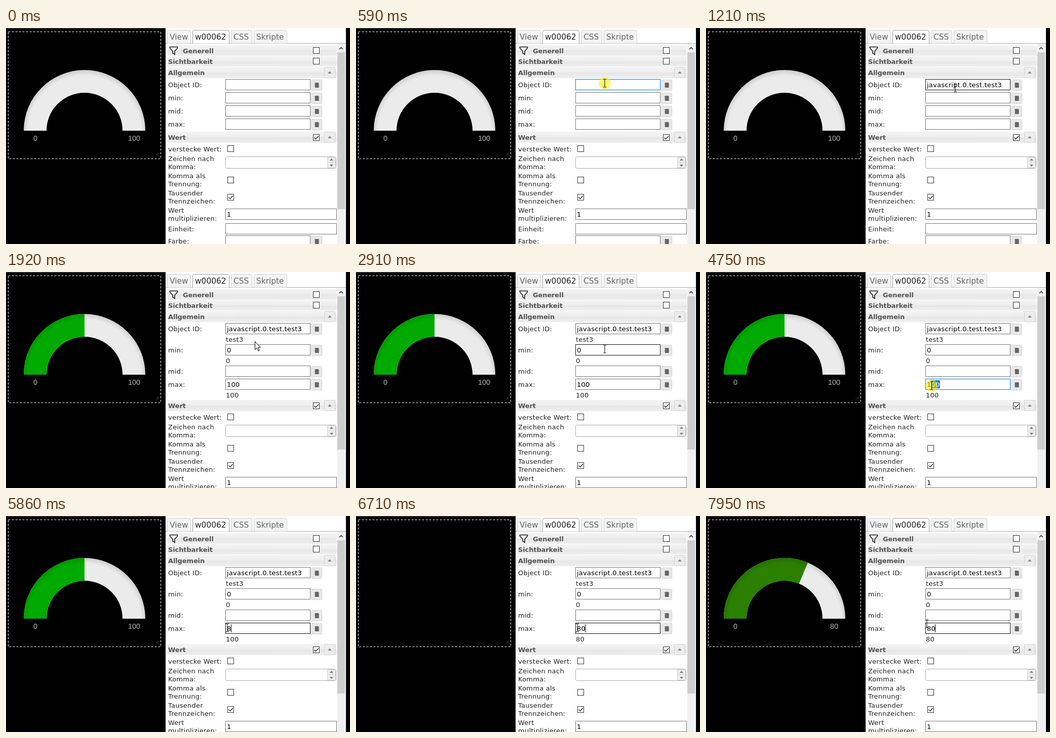
These frames come from a looping animation (679 by 427 pixels, 8 s). An HTML page:

```html
<!DOCTYPE html>
<html lang="de">
<head>
<meta charset="utf-8">
<title>Gauge settings</title>
<style>
html, body { margin: 0; width: 100%; height: 100%; overflow: hidden; background: #000; }
svg { display: block; }
text { font: 13px "DejaVu Sans", sans-serif; letter-spacing: .25px; fill: #222; white-space: pre; }
.head { font-weight: bold; letter-spacing: -.12px; fill: #555; }
.tab { font-size: 15.4px; letter-spacing: 0; fill: #666; }
.tab.on { fill: #222; }
.val { fill: #000; }
.scale { font: 14.5px "Liberation Sans", sans-serif; letter-spacing: 0; fill: #b3b3b3; text-anchor: middle; }
</style>
</head>
<body>
<svg id="stage" width="679" height="427" viewBox="0 0 679 427">
  <defs>
    <linearGradient id="bar" x2="0" y2="1">
      <stop offset="0" stop-color="#f3f3f3"/><stop offset=".48" stop-color="#eee"/>
      <stop offset=".5" stop-color="#e6e6e6"/><stop offset="1" stop-color="#eee"/>
    </linearGradient>
    <radialGradient id="shade" gradientUnits="userSpaceOnUse" cx="155" cy="206" r="123">
      <stop offset=".91" stop-opacity="0"/><stop offset="1" stop-opacity=".13"/>
    </radialGradient>
  </defs>
</svg>
<script>
const LOOP = 8000;
const stage = document.getElementById('stage');
const $ = id => document.getElementById(id);

// Markup helpers
const box = (x, y, w, h, fill, stroke, more = '') =>
  `<rect x="${x + .5}" y="${y + .5}" width="${w - 1}" height="${h - 1}" fill="${fill}" stroke="${stroke}" ${more}/>`;
const fillBox = (x, y, w, h, fill, more = '') =>
  `<rect x="${x}" y="${y}" width="${w}" height="${h}" fill="${fill}" ${more}/>`;
const text = (x, y, s, cls = '', more = '') => `<text x="${x}" y="${y}" class="${cls}" ${more}>${s}</text>`;
const path = (d, fill, stroke = 'none', more = '') => `<path d="${d}" fill="${fill}" stroke="${stroke}" ${more}/>`;
const group = (id, s) => `<g id="${id}">${s}</g>`;

const sector = share => {
  const a = Math.PI * (1 - share), c = Math.cos(a), s = Math.sin(a);
  return `M35 203A120 120 0 0 1 ${155 + 120 * c} ${203 - 120 * s}` +
    `L${155 + 75 * c} ${203 - 75 * s}A75 75 0 0 0 80 203Z`;
};

const check = (x, y, on) => box(x, y, 13, 13, '#fff', '#333') +
  (on ? path(`M${x + 2.5} ${y + 6.5}l3 3l5.5 -6`, 'none', '#222', 'stroke-width="1.3"') : '');
const bar = (y, h) => fillBox(319, y, 334, h, 'url(#bar)');
const collapse = y => box(628, y, 22, 22, '#ececec', '#d3d3d3', 'rx="2"') +
  path(`M635 ${y + 13}h8l-4 -4.5z`, '#888');
const picker = y => box(602, y, 22, 22, '#e8e8e8', '#d3d3d3', 'rx="2"') +
  fillBox(610, y + 6, 7, 10, '#666') +
  path(`M609 ${y + 7.5}h2m-2 3h2m-2 3h2`, 'none', '#666') +
  path(`M617.5 ${y + 7}v9`, 'none', '#999');

const fields = [];
const field = (name, y, w, shift) => {
  fields.push({ name, y, w, shift });
  return box(433, y, w, 22, '#fff', '#767676', `id="f-${name}"`);
};
const idRow = (name, label, y, shift) => text(320, y + 16, label) + field(name, y, 168, shift) + picker(y + 1);
const pair = (y, a, b) => text(320, y, a) + text(320, y + 16, b);
const tab = (x, w, s, on) =>
  path(`M${x + .5} 30.5V7.5q0 -3 3 -3h${w - 7}q3 0 3 3v23`, on ? '#fff' : '#f3f3f3', on ? '#999' : '#d0d0d0') +
  text(x + 5, 23, s, on ? 'tab on' : 'tab');

const gauge = group('gauge',
  path(sector(1), '#ebebeb') + path('', '#00aa00', 'none', 'id="fill"') + path(sector(1), 'url(#shade)') +
  text(58, 223, '0', 'scale') + text(253, 223, '100', 'scale', 'id="top"'));

const left = fillBox(0, 0, 679, 427, '#000') + fillBox(0, 0, 315, 1, '#555') +
  box(4, 7, 302, 252, 'none', '#fff', 'stroke-dasharray="4 3"') +
  path('M301 245V252H294Z', '#1b1b1b') + gauge;

const panel = fillBox(315, 0, 356, 427, '#fff') + fillBox(315, 30, 356, 1, '#aaa') +
  tab(318, 47, 'View') + tab(368, 73, 'w00062', true) + tab(444, 42, 'CSS') + tab(489, 66, 'Skripte') +
  fillBox(654, 31, 16, 396, '#f0f0f0') + fillBox(654, 48, 15, 310, '#cdcdcd', 'id="thumb"') +
  path('M658 42l3.5 -3.5l3.5 3.5', 'none', '#505050', 'stroke-width="1.8"');

const heads = bar(34, 21) + bar(56, 20) + bar(77, 22) +
  path('M323.5 37.5h15v2l-5.5 6.5v6.5l-4 -3v-3.500l-5.500 -6.500z', 'none', '#222', 'stroke-width="1.6"') +
  text(349, 50, 'Generell', 'head') + text(320, 71, 'Sichtbarkeit', 'head') + text(320, 93, 'Allgemein', 'head') +
  check(606, 38) + check(606, 59) + collapse(77);

const rows = idRow('obj', 'Object ID:', 101, 0) + text(436, 117, '', 'val', 'id="obj"') +
  group('min', idRow('min', 'min:', 127, 16) + text(436, 143, '', 'val', 'id="low"')) +
  group('mid', idRow('mid', 'mid:', 153, 32)) +
  group('max', idRow('max', 'max:', 179, 32) + fillBox(436, 182, 0, 16, '#0078d7', 'id="sel"') +
    text(436, 195, '', 'val', 'id="high"') + fillBox(0, 182, 1, 16, '#000', 'id="caret"')) +
  group('notes', text(434, 138, 'test3') + text(434, 180, '0') + text(434, 248, '100', '', 'id="note"'));

const rest = group('rest',
  bar(205, 22) + text(320, 221, 'Wert', 'head') + check(606, 210, true) + collapse(205) +
  text(320, 244, 'verstecke Wert:') + check(437, 232) +
  pair(263, 'Zeichen nach', 'Komma:') + box(433, 254, 219, 24, '#fff', '#aaa', 'rx="3"') +
  box(634, 255, 17, 22, '#eee', '#d3d3d3') + fillBox(634, 265, 17, 1, '#d3d3d3') +
  path('M639 262h7l-3.5 -4zM639 270h7l-3.5 4z', '#777') +
  pair(297, 'Komma als', 'Trennung:') + check(437, 294) +
  pair(331, 'Tausender', 'Trennzeichen:') + check(437, 328, true) +
  pair(365, 'Wert', 'multiplizieren:') + field('mul', 357, 220, 48) + text(436, 373, '1', 'val') +
  text(320, 402, 'Einheit:') + field('unit', 386, 220, 48) +
  text(320, 426, 'Farbe:') + field('color', 410, 168, 48) + picker(411));

const mouse = group('mouse',
  '<circle id="halo" r="12" fill="#ffee00" fill-opacity=".55"/>' +
  path('M-3 -8h2.500l.5 .5l.5 -.5H3M0 -7.500V7.500M-3 8h2.500l.5 -.5l.5 .5H3', 'none', '#000', 'id="beam"') +
  path('M.5 .5v16l3.700 -3.500l2.600 6l2.400 -1l-2.600 -5.800h5z', '#fff', '#000', 'id="arrow"'));

stage.insertAdjacentHTML('beforeend', left + panel + heads + rows + rest + mouse);

// Pointer: [time, x, y, look]
const OFF = 0, ARROW = 1, BEAM = 2, PRESS = 3;
const pointer = [
  [0, 0, 0, OFF],
  [190, 560, 413, BEAM], [260, 548, 370, BEAM], [350, 530, 290, ARROW], [430, 510, 200, ARROW],
  [500, 497, 140, BEAM], [590, 491, 109, PRESS], [660, 491, 110, PRESS], [740, 491, 111, BEAM],
  [1130, 491, 114, BEAM], [1210, 492, 118, BEAM], [1280, 492, 121, BEAM],
  [1350, 491, 125, ARROW], [1430, 491, 127, ARROW], [1510, 491, 129, ARROW], [1740, 491, 137, ARROW],
  [2450, 0, 0, OFF], [2600, 491, 147, BEAM], [2750, 491, 149, BEAM], [2910, 491, 152, BEAM], [2990, 491, 153, BEAM],
  [4070, 487, 223, PRESS], [5060, 436, 225, BEAM], [5130, 437, 226, BEAM],
  [5530, 437, 225, BEAM], [5610, 437, 223, BEAM], [5690, 437, 221, BEAM], [7950, 436, 213, BEAM]
];
const carets = [[0, 0], [4070, 1], [5860, 1], [6160, 0], [6620, 1], [7170, 0], [7720, 1]];
const highs = [[0, ''], [1830, '100'], [5860, '8'], [6090, '80']];
const shares = [[0, 0], [1830, -1], [1920, .5], [6710, -1], [6790, .625]];

const at = (table, t) => table.findLast(step => step[0] <= t);
const show = (id, on) => $(id).setAttribute('visibility', on ? 'visible' : 'hidden');
const set = (id, s) => { if ($(id).textContent !== s) $(id).textContent = s; };
const move = (id, x, y) => $(id).setAttribute('transform', `translate(${x} ${y})`);

const DIGIT = 8.52;

function draw(t) {
  const open = t >= 1830;
  move('min', 0, open ? 16 : 0);
  move('mid', 0, open ? 32 : 0);
  move('max', 0, open ? 32 : 0);
  move('rest', 0, open ? 48 : 0);
  show('notes', open);
  $('thumb').setAttribute('height', open ? 303 : 310);
  set('obj', t >= 890 ? 'javascript.0.test.test3' : '');
  set('low', open ? '0' : '');
  set('note', t >= 6710 ? '80' : '100');

  const share = at(shares, t)[1];
  show('gauge', share >= 0);
  if (share >= 0) {
    const mix = Math.max(0, share - .5) * 2;
    $('fill').setAttribute('d', share ? sector(share) : '');
    $('fill').setAttribute('fill', `rgb(${170 * mix},${170 * (1 - mix)},0)`);
    set('top', t >= 6790 ? '80' : '100');
  }

  let [, x, y, look] = at(pointer, t);
  const dragging = t >= 4070 && t < 5060;
  if (dragging) {
    const p = Math.min(10, Math.floor((t - 4070) / 76)) / 10;
    x = 487 - 52 * p;
    y = 223 + 2 * p;
  }
  move('mouse', x, y);
  show('halo', look === PRESS);
  show('beam', look >= BEAM);
  show('arrow', look === ARROW);
  for (const f of fields) {
    const top = f.y + (open ? f.shift : 0);
    const over = look && x >= 433 && x < 433 + f.w && y >= top && y < top + 22;
    $('f-' + f.name).setAttribute('stroke', !over ? '#767676' : look === PRESS ? '#0078d7' : '#111');
  }

  // Value of "max" with its selection and caret
  const value = at(highs, t)[1];
  let kept = value.length;
  if (dragging) kept = Math.max(0, Math.min(3, Math.round((x - 436) / DIGIT)));
  else if (t >= 5060 && t < 5860) kept = 0;
  $('high').innerHTML = `${value.slice(0, kept)}<tspan fill="#fff">${value.slice(kept)}</tspan>`;
  $('sel').setAttribute('x', 436 + kept * DIGIT);
  $('sel').setAttribute('width', (value.length - kept) * DIGIT);
  $('caret').setAttribute('x', Math.floor(436 + kept * DIGIT - .4));
  show('caret', at(carets, t)[1] && kept === value.length);
}

const start = performance.now();
function tick() {
  draw((performance.now() - start) % LOOP);
  requestAnimationFrame(tick);
}
tick();
</script>
</body>
</html>
```
